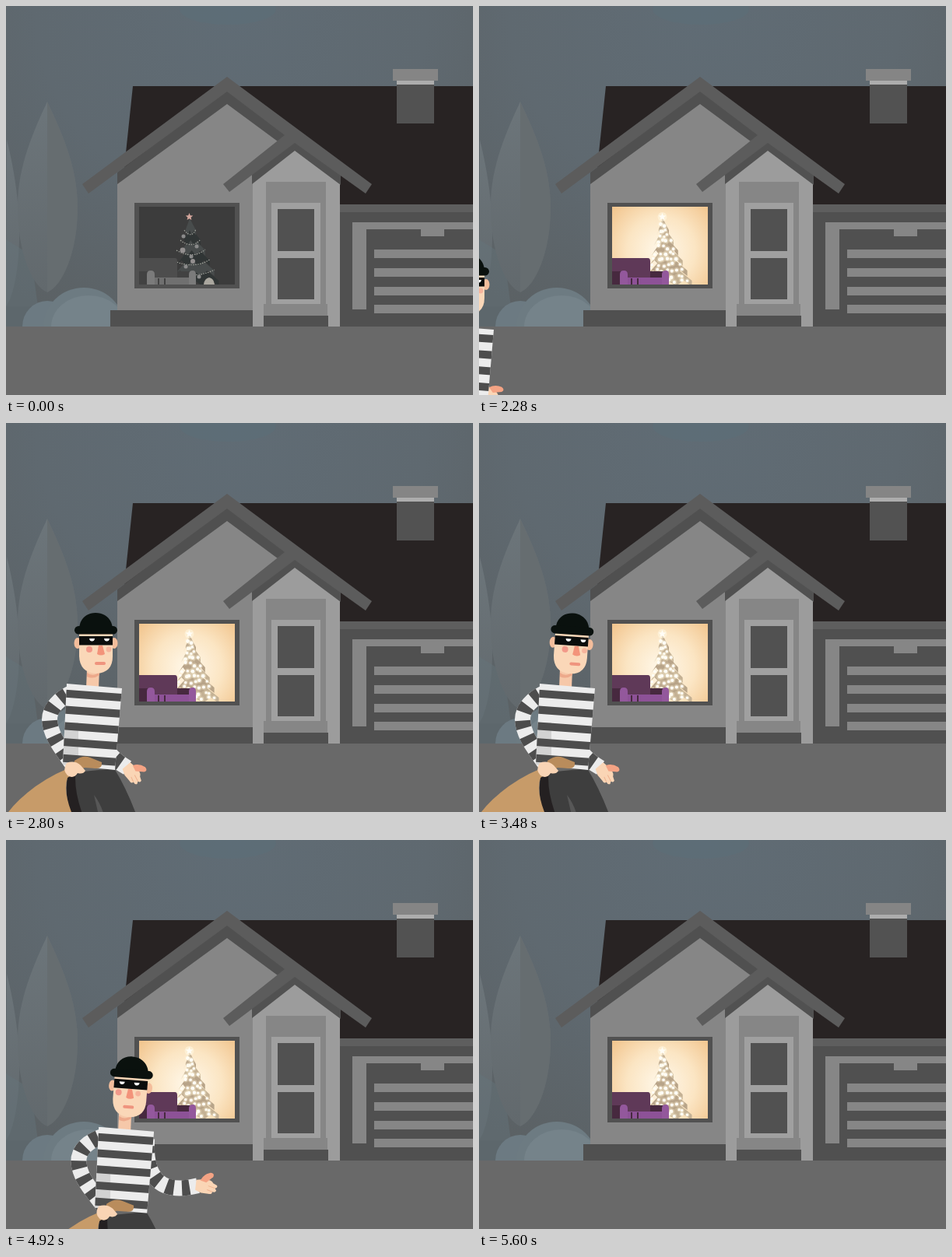
Write an HTML page that moves like this. It is 600 by 500 pixels and loops after 6120 ms.

```html
<!DOCTYPE html>
<html lang="en">
<head>
<meta charset="utf-8">
<title>Night visitor</title>
<style>
html, body { margin: 0; width: 100%; height: 100%; overflow: hidden; background: #5f6a71; }
svg { display: block; width: 100vw; height: 100vh; }
</style>
</head>
<body>
<svg viewBox="0 0 600 500">
  <defs>
    <radialGradient id="sky" gradientUnits="userSpaceOnUse" cx="290" cy="0" r="460">
      <stop offset="0" stop-color="#606c75"/>
      <stop offset=".55" stop-color="#5f6970"/>
      <stop offset="1" stop-color="#5b6164"/>
    </radialGradient>
    <radialGradient id="glow" gradientUnits="userSpaceOnUse" cx="234" cy="314" r="88">
      <stop offset="0" stop-color="#fff8ea"/>
      <stop offset=".5" stop-color="#fbe5c3"/>
      <stop offset="1" stop-color="#f0c086"/>
    </radialGradient>
    <linearGradient id="leaf" x1="0" y1="0" x2="0" y2="1">
      <stop offset="0" stop-color="#6c757a"/>
      <stop offset="1" stop-color="#62696d"/>
    </linearGradient>
    <clipPath id="pane"><rect x="171" y="258" width="123" height="100"/></clipPath>
    <clipPath id="shirt"><path d="M78 335L149 341L140 446L73 439Z"/></clipPath>
  </defs>

  <rect width="600" height="500" fill="url(#sky)"/>
  <ellipse cx="285" cy="4" rx="62" ry="20" fill="#5c6f79" opacity=".6"/>

  <!-- garden -->
  <path d="M0 386H143V412H0Z" fill="#575d60"/>
  <path d="M1 172C12 215 18 262 17 300C16 345 8 376 0 386Z" fill="url(#leaf)"/>
  <path d="M0 300L32 320L41 386V412H0Z" fill="#65737b" opacity=".45"/>
  <path d="M53 123C70 160 92 205 92 258C92 318 72 360 53 368C34 360 15 318 15 258C15 205 36 160 53 123Z" fill="url(#leaf)"/>
  <path d="M53 123C70 160 92 205 92 258C92 318 72 360 53 368Z" fill="#666d70"/>
  <path d="M21 412a32 33 0 0 1 64 0Z" fill="#6c7a82"/>
  <path d="M48 412a52 50 0 0 1 104 0Z" fill="#6d7b82"/>
  <path d="M58 412a48 40 0 0 1 96 0Z" fill="#75838a"/>

  <!-- house -->
  <path d="M163 103H600V255H147Z" fill="#282323"/>
  <path d="M502 96H550V151H502Z" fill="#525252"/>
  <path d="M502 95H550V101H502Z" fill="#adadad"/>
  <path d="M497 81H555V96H497Z" fill="#858585"/>
  <path d="M429 255H600V265H429Z" fill="#5e5e5e"/>
  <path d="M429 265H600V412H429Z" fill="#505050"/>
  <path d="M445 278H600V287H563V296H533V287H463V390H445Z" fill="#868686"/>
  <path d="M473 313H600V324H473ZM473 337H600V348H473ZM473 361H600V372H473ZM473 384H600V395H473Z" fill="#868686"/>
  <path d="M143 228L284 112L360 172L318 232V392H143Z" fill="#868686"/>
  <path d="M143 214L284 108L362 166L349 174L284 126L143 229Z" fill="#505050"/>
  <path d="M134 391H318V412H134Z" fill="#505050"/>
  <path d="M317 222L371 180L429 222V412H317Z" fill="#9c9c9c"/>
  <path d="M334 226H411V412H334Z" fill="#868686"/>
  <path d="M341 253H404V383H341Z" fill="#a0a0a0"/>
  <path d="M349 261H396V315H349ZM349 324H396V377H349Z" fill="#515151"/>
  <path d="M331 383H413V398H331Z" fill="#868686"/>
  <path d="M331 398H414V412H331Z" fill="#505050"/>
  <path d="M316 216L371 174L430 216V230L371 186L316 229Z" fill="#515151"/>
  <path d="M98 229L284 91L470 229L462 241L371 176L287 239L279 229L358 166L284 110L106 241Z" fill="#5c5c5c"/>
  <path d="M0 412H600V500H0Z" fill="#696969"/>

  <!-- window -->
  <path d="M165 253H300V363H165Z" fill="#515151"/>
  <rect id="room" x="171" y="258" width="123" height="100"/>
  <g id="inside" clip-path="url(#pane)"></g>

  <!-- burglar -->
  <g id="man">
    <path d="M79 450L139 444Q155 470 168 505V660H84V500Z" fill="#3e3e3e"/>
    <path d="M80 448L90 444Q86 470 99 505H84Q74 478 80 448Z" fill="#242021"/>
    <path d="M113 478Q121 488 126 504H119Z" fill="#575757"/>
    <g id="armR"></g>
    <g id="armL"></g>
    <path d="M104 316H120L119 341H103Z" fill="#f6c8a9"/>
    <path d="M104 321Q112 327 120 320V324Q112 330 104 326Z" fill="#eda98b"/>
    <g clip-path="url(#shirt)">
      <path d="M65 330H155V450H65Z" fill="#ececec"/>
      <path d="M65 385H93V450H65Z" fill="#d2d2d2"/>
      <g id="bands" stroke="#4d4d4d" stroke-width="10"></g>
    </g>
    <path d="M92 440Q65 448 38 467Q15 484 3 500L-13 660H95L86 505Q73 474 79 456L94 446Z" fill="#c79b69"/>
    <path d="M88 434Q99 426 108 430L123 436Q124 444 116 444L101 443L86 450Z" fill="#b98c5c"/>
    <path d="M78 437Q88 433 96 440L102 447Q99 452 92 450Q87 458 79 453Q72 446 78 437Z" fill="#f9d4b4"/>
    <g id="head">
      <ellipse cx="92" cy="283" rx="4.5" ry="7" fill="#f4bd9b"/>
      <ellipse cx="139" cy="283" rx="4.5" ry="7" fill="#f4bd9b"/>
      <path d="M94 264H137V300Q137 321 116 322Q95 321 94 300Z" fill="#fad7b8"/>
      <path d="M94 274H137V285.500H94Z" fill="#0b0d0c"/>
      <g id="face">
        <circle cx="107" cy="291" r="4" fill="#f2998a"/>
        <circle cx="132" cy="291" r="3.4" fill="#f6b49c"/>
        <path d="M107 277H114Q113.500 280.500 110.500 280.500Q107.500 280.500 107 277ZM126 277H133Q132.500 280.500 129.500 280.500Q126.500 280.500 126 277Z" fill="#fff"/>
        <path d="M119 286H124L127 297Q122 300 117 297Z" fill="#f3937a"/>
        <rect x="114" y="307" width="14" height="4" rx="2" fill="#ef947e"/>
      </g>
      <path d="M94 266C94 251 104 244 115 244C127 244 137 252 137 266Z" fill="#0a110e"/>
      <rect x="88" y="261" width="55" height="10.500" rx="5.200" fill="#0a110e"/>
    </g>
  </g>
</svg>
<script>
const LOOP = 6120, STEP = 40, start = performance.now();
const $ = id => document.getElementById(id);
const path = (d, fill, more = '') => `<path d="${d}" fill="${fill}" ${more}/>`;
const dot = (x, y, r, fill, more = '') => `<circle cx="${x}" cy="${y}" r="${r}" fill="${fill}" ${more}/>`;

function random(seed) {
  return () => (seed = (seed * 16807) % 2147483647) / 2147483647;
}

// Christmas tree: overlapping tiers with ragged hems
function tree(fills) {
  let out = '';
  for (let i = 5; i >= 0; i--) {
    const top = 273 + i * 11, low = 293 + i * 13, half = 8 + i * 4.6, mid = 236 + i * 1.3;
    let d = `M${mid} ${top}L${mid + half} ${low - 5}`;
    for (let k = 0; k <= 6; k++) {
      const x = mid + half - k * half / 3;
      d += `L${x} ${low + (k % 2 ? -5 : 2)}`;
    }
    out += path(d + 'Z', fills[i % 2]);
  }
  return out;
}

function star(fill) {
  let d = '';
  for (let k = 0; k < 10; k++) {
    const a = k * Math.PI / 5 - Math.PI / 2, r = k % 2 ? 2.2 : 5;
    d += `${k ? 'L' : 'M'}${235.5 + r * Math.cos(a)} ${271 + r * Math.sin(a)}`;
  }
  return path(d + 'Z', fill);
}

function sofa(back, dark, arm, seat) {
  return path('M171 324H217Q220 324 220 328V358H171Z', back) +
    path('M171 341H183V358H171ZM220 341H238V358H220Z', dark) +
    path('M191 349H236V358H191Z', seat) +
    path('M181 358V345Q181 340 186 340Q191 340 191 345V358ZM235 358V345Q235 340 240 340Q244 340 244 345V358Z', arm) +
    path('M195 350H197V358H195ZM203 350H205V358H203Z', dark);
}

function darkRoom() {
  let out = tree(['#484c4c', '#303535']);
  for (let i = 0; i < 5; i++) {
    const y = 288 + i * 13, w = 7 + i * 5;
    out += path(`M${236 - w} ${y}Q${238 + i} ${y + 12} ${237 + w + i} ${y - 1}`, 'none',
      'stroke="#a5a79f" stroke-width="1.2" stroke-dasharray="1.4 1.6"');
    out += dot(228 + (i * 17) % 24, y + 8, 2.5, '#8b8b8b');
  }
  return out + dot(227, 314, 3.4, '#949090') + dot(240, 328, 3, '#949090') +
    path('M254 358Q255 350 261 349Q267 350 268 358Z', '#aaa79f') + star('#d5a79d') +
    sofa('#4d4d4d', '#424242', '#7b7b7b', '#707070');
}

// Bulbs sit in rows that widen downwards
function litRoom(bright) {
  const rnd = random(41);
  let out = tree(['#b8a489', '#c4b194']);
  for (let row = 0; row < 11; row++) {
    const count = 2 + Math.round(row * .6), half = 3 + row * 2.4;
    for (let k = 0; k < count; k++) {
      const x = 236 + row * .6 + half * ((2 * k + .4 + 1.2 * rnd()) / count - 1);
      const y = 281 + row * 7.3 + rnd() * 5 - 2.5, r = 1.6 + rnd() * .9;
      out += dot(x, y, r * 1.7, '#fff3d8', `opacity="${bright}"`) + dot(x, y, r, '#fffdf6');
    }
  }
  return out + dot(235.5, 271, 6, '#fff6e0', 'opacity=".6"') + star('#fffdf6') +
    sofa('#5f3958', '#47293f', '#93589c', '#8d5297');
}

const rooms = [darkRoom(), litRoom(.25), litRoom(.35)];
let shown = -1;
function drawRoom(t) {
  const n = t < 1040 ? 0 : t < 1360 ? 1 : 2;
  if (n === shown) return;
  shown = n;
  $('room').setAttribute('fill', n ? 'url(#glow)' : '#3c3c3c');
  $('inside').innerHTML = rooms[n];
}

for (let i = 0; i < 5; i++) {
  const y = 350 + i * 20.8;
  $('bands').innerHTML += `<path d="M65 ${y - 3}L155 ${y + 3.5}"/>`;
}

// time, x, y, upper arm, forearm, head tilt, face turn, left elbow
const poses = [
  [2280, -130, 75, 140, 40, 0, 0, 0],
  [2600, 0, 0, 17, -10, 0, 0, 0],
  [2800, 0, 0, 108, 50, 0, 0, 0],
  [2920, 0, 0, 108, 50, 0, 0, 0],
  [3180, 0, 0, 25, -8, 3, 2, 0],
  [3440, 0, 0, 108, 50, 4, 1, 0],
  [4160, 0, 0, 108, 50, 5, 1, 0],
  [4520, 0, 0, 108, 50, 5, -6, 0],
  [4800, 0, 0, 92, 25, 5, -6, 0],
  [5120, 130, 107, 40, -33, 3, -7, 1],
  [5440, 178, 97, 70, -20, 3, -4, 0],
  [5600, 206, 230, 60, -25, 3, -4, 0]
];

function poseAt(t) {
  const i = Math.max(1, poses.findIndex(p => p[0] > t));
  const a = poses[i - 1], b = poses[i];
  const k = (t - a[0]) / (b[0] - a[0]), e = k * k * (3 - 2 * k);
  return a.map((v, n) => v + (b[n] - v) * e).slice(1);
}

function sleeve(d) {
  return path(d, 'none', 'stroke="#ececec" stroke-width="20"') +
    path(d, 'none', 'stroke="#4d4d4d" stroke-width="20" stroke-dasharray="10 10.500" stroke-dashoffset="-9"');
}

const hand = path('M-3 -7L8 -9Q17 -9 19 -5L24 -3Q26 0 22 1L24 4Q23 7 19 6Q19 10 14 9L5 9L-3 6Z', '#fad5b5') +
  path('M2 -7Q5 -15 14 -18Q20 -18 18 -13L10 -5Z', '#f4a384') +
  path('M13 -1L22 1M12 4L19 6', 'none', 'stroke="#eeb28f"');

function polar(p, angle, len) {
  const a = angle * Math.PI / 180;
  return [p[0] + len * Math.cos(a), p[1] + len * Math.sin(a)];
}

function drawMan(t) {
  const on = t >= 2280 && t < 5600;
  $('man').style.display = on ? '' : 'none';
  if (!on) return;
  const [x, y, upper, fore, tilt, turn, out] = poseAt(t);
  $('man').setAttribute('transform', `translate(${x} ${y})`);
  $('head').setAttribute('transform', `rotate(${tilt} 111 328)`);
  $('face').setAttribute('transform', `translate(${turn})`);

  const s = [140, 350], e = polar(s, upper, 56), w = polar(e, fore, 52);
  const c = e.map((v, i) => 2 * v - (s[i] + w[i]) / 2);
  $('armR').innerHTML = sleeve(`M${s}Q${c} ${w}`) +
    `<g transform="translate(${w}) rotate(${fore})">${hand}</g>`;
  $('armL').innerHTML = sleeve(
    `M86 346C${68 - 12 * out} ${354 - 4 * out} ${56 - 14 * out} ${367 - 7 * out} ${56 - 12 * out} ${381 - 3 * out}` +
    `C${57 - 10 * out} 402 71 418 84 437`);
}

function frame() {
  const t = Math.floor((performance.now() - start) % LOOP / STEP) * STEP;
  drawRoom(t);
  drawMan(t);
  requestAnimationFrame(frame);
}
frame();
</script>
</body>
</html>
```
